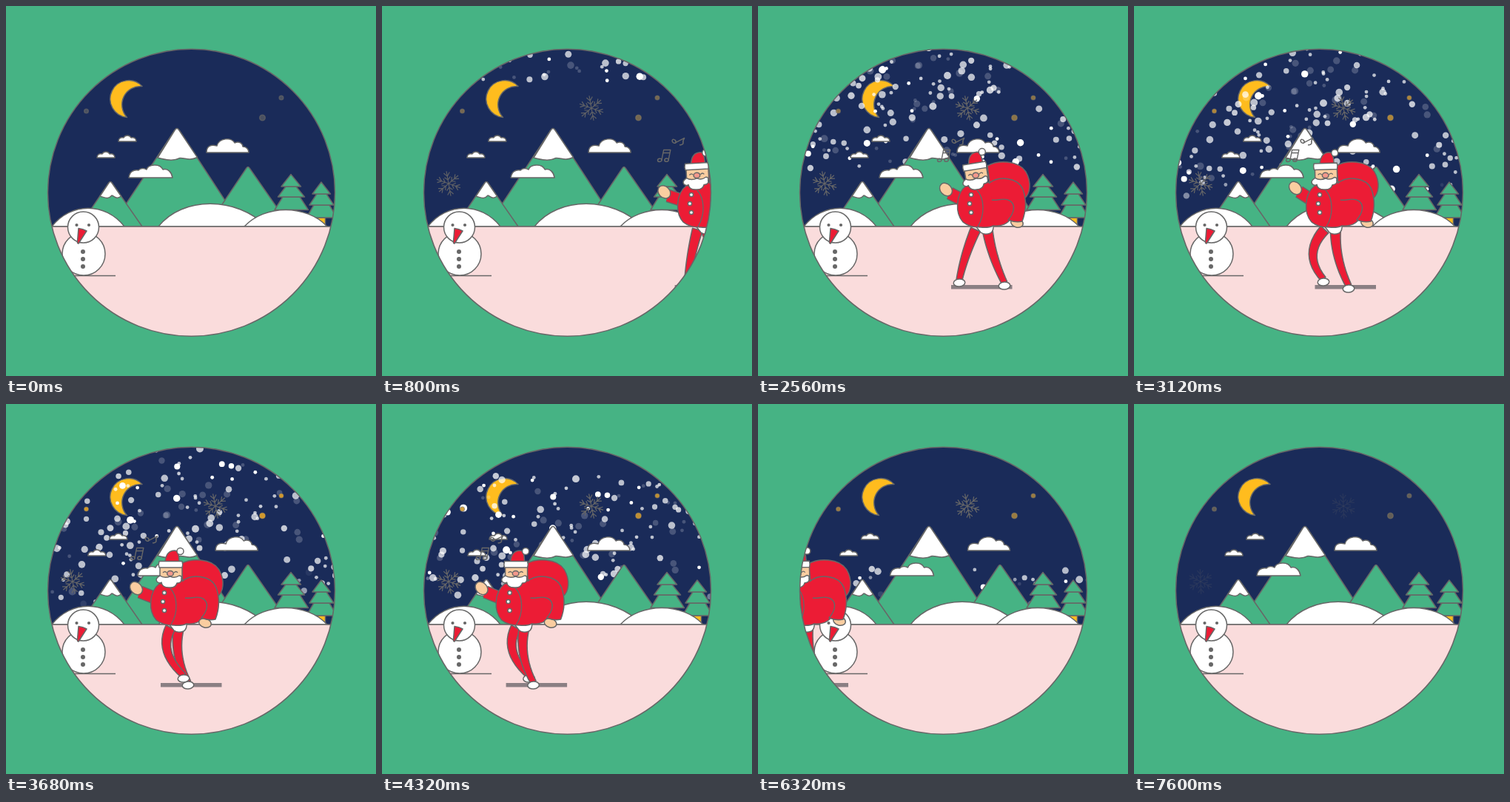
An HTML page with a canvas that plays this animation: 500 px wide and 500 px high, repeating every 7.68 s.

```html
<!DOCTYPE html>
<html lang="en">
<head>
<meta charset="utf-8">
<title>Winter walk</title>
<style>
html, body { margin: 0; width: 100%; height: 100%; overflow: hidden; background: #46b384; }
canvas { display: block; width: 500px; height: 500px; }
</style>
</head>
<body>
<canvas id="stage" width="500" height="500"></canvas>
<script>
const ctx = document.getElementById('stage').getContext('2d');
const LOOP = 7680, STEP = 80, STRIDE = 1280;
const GREEN = '#46b384', NAVY = '#1a2b59', PINK = '#fadcdc', RED = '#ec1c35',
  GOLD = '#ffbc1e', SKIN = '#facda0', LINE = '#676767', WHITE = '#fff';

// Piecewise interpolation through [time, value] pairs.
function track(keys, t, ease = u => u) {
  for (let i = 1; i < keys.length; i++) {
    const [t0, a] = keys[i - 1], [t1, b] = keys[i];
    if (t <= t1) return a + (b - a) * ease((t - t0) / (t1 - t0));
  }
  return keys[keys.length - 1][1];
}
const smooth = u => (1 - Math.cos(Math.PI * u)) / 2;

function paint(path, fill, line = LINE, width = 1.5) {
  if (fill) { ctx.fillStyle = fill; ctx.fill(path); }
  if (line) { ctx.strokeStyle = line; ctx.lineWidth = width; ctx.stroke(path); }
}
const shape = (d, fill, line, width) => paint(new Path2D(d), fill, line, width);
function oval(x, y, rx, ry, fill, line, turn = 0) {
  const p = new Path2D();
  p.ellipse(x, y, rx, ry, turn, 0, 7);
  paint(p, fill, line);
}
const dot = (x, y, r, fill, line = null) => oval(x, y, r, r, fill, line);
function at(x, y, turn, draw) {
  ctx.save();
  ctx.translate(x, y);
  ctx.rotate(turn);
  draw();
  ctx.restore();
}

let seed = 4127;
function rnd() {
  seed = (seed * 16807) % 2147483647;
  return seed / 2147483647;
}
const snow = Array.from({ length: 250 }, () => ({
  x: 56 + rnd() * 389,
  born: rnd() * 3600,
  speed: 0.061 + rnd() * 0.006,
  life: 2900 + rnd() * 600,
  r: rnd() < 0.4 ? 2.4 : 3.6 + rnd() * 1.4,
  alpha: [0.2, 0.7, 0.7, 0.7, 0.75, 1][Math.floor(rnd() * 6)]
}));

function drawSnow(t) {
  for (const s of snow) {
    const age = t - s.born;
    if (age < 0 || age > s.life) continue;
    ctx.globalAlpha = s.alpha * Math.min(1, (s.life - age) / 200);
    dot(s.x, 52 + s.speed * age, s.r, WHITE);
  }
  ctx.globalAlpha = 1;
}

const twinkle = [[0, 0], [1520, 0.5], [2560, 0.4], [3680, 0.85], [5040, 0.6], [6320, 0.5], [7600, 0.15], [7680, 0]];
function drawStars(t) {
  const glow = track(twinkle, t);
  for (const [x, y, r] of [[108.5, 142, 2.8], [346.5, 151, 3.8], [372, 124, 2.8]]) {
    ctx.globalAlpha = 0.65;
    dot(x, y, r, '#666', '#666');
    ctx.globalAlpha = glow;
    dot(x, y, r, '#e8a526');
  }
  ctx.globalAlpha = 1;
}

function drawFlakes(t) {
  const alpha = track([[0, 0], [900, 1], [6700, 1], [7600, 0.2], [7680, 0]], t);
  ctx.globalAlpha = alpha;
  for (const [x, y] of [[90, 240], [283, 138]]) {
    at(x, y, -0.2 * alpha, () => {
      for (let i = 0; i < 6; i++) {
        shape('M0 0V-17M-4 -15L0 -10L4 -15M-4 -9L0 -5L4 -9', null, LINE, 1.2);
        ctx.rotate(Math.PI / 3);
      }
    });
  }
  ctx.globalAlpha = 1;
}

const drift = [[0, 0], [1300, 12], [2560, -2], [3800, 12.5], [5080, -3], [6350, 12.5], [7600, 0], [7680, 0]];
const SMALL = 'M0 0C0 -4 3 -6 7 -5C9 -9 15 -9 17 -5C21 -6 24 -4 24 0Z';
function drawClouds(t) {
  const d = track(drift, t, smooth);
  const cloud = (x, y, path) => at(x, y, 0, () => shape(path, WHITE));
  cloud(152 - d, 183, SMALL);
  cloud(123 - d, 205, SMALL);
  cloud(271 + d, 198, 'M0 0C0 -9 6 -11 14 -9C17 -20 34 -21 38 -13C44 -16 49 -12 49 -8C54 -8 57 -4 57 0Z');
  cloud(166 + d, 232, 'M0 0C1 -8 6 -11 13 -10C16 -13 20 -13 24 -11C26 -18 42 -20 46 -11C53 -13 58 -7 59 0Z');
}

function drawLand() {
  shape('M142 298L228 168Q231 163 234 168L319 298Z', GREEN);
  shape('M205 205L228 168Q231 163 234 168L258.500 204.500C246 210 243 205 235 205.500C226 210 216 208 205 205Z', WHITE);
  shape('M99 298L139 239Q141 236 143 239L184 298Z', GREEN);
  shape('M127 257L139 239Q141 236 143 239L155.500 257C149 262 147 257 143 256C138 262 134 259 127 257Z', WHITE);
  shape('M272 298L325 219Q327 216 329 219L384 298Z', GREEN);
  // Trees, bottom tier first
  shape('M379 275H391V298H379Z', GOLD);
  shape('M374 258L363 275.500H408.500L397 258Z', GREEN);
  shape('M378 244L367.500 258H403.500L392 244Z', GREEN);
  shape('M385 227.500L372 244H398.500Z', GREEN);
  shape('M421 286H431.500V298H421Z', GOLD);
  shape('M416 269L406 286H447L437 269Z', GREEN);
  shape('M420 254L410 269H443L433 254Z', GREEN);
  shape('M426 238L414 254H438.500Z', GREEN);
  // Snow hills
  shape('M62 298C88 265 134 265 160 298Z', WHITE);
  shape('M206 298C238 257 312 257 352 298Z', WHITE);
  shape('M322 298C350 268 406 268 434 298Z', WHITE);
  shape('M40 298H460V460H40Z', PINK);
}

function drawSnowman() {
  shape('M93 364.500H148', null);
  dot(105, 335, 29, WHITE, LINE);
  dot(104.500, 299, 21, WHITE, LINE);
  dot(95.500, 296, 2.1, LINE);
  dot(112, 296, 2.1, LINE);
  shape('M98 300.500Q104 301 109 304L98 321Q96 321 96.500 318Z', RED);
  for (const y of [332, 342, 352]) dot(104, y, 3, LINE);
}

// One foot over a full stride; the other foot runs half a stride later.
const footX = [[0, -34], [240, -18], [480, 14], [560, 21], [640, 27], [880, 60], [1120, 8], [1200, -13], [1280, -34]];
const footY = [[0, 374], [240, 376], [480, 380], [560, 382], [640, 378], [880, 360], [1120, 371], [1200, 373], [1280, 374]];
const kneeBend = [[0, 2], [240, 1], [480, 7], [640, 3], [880, 10], [1120, 13], [1200, 15], [1280, 2]];

function drawLeg(phase) {
  const p = phase % STRIDE;
  const fx = track(footX, p), fy = track(footY, p);
  const hx = -4 - 8 * Math.cos(p / STRIDE * 2 * Math.PI), hy = 302;
  const ax = fx, ay = fy - 4;
  const cx = (hx + ax) / 2 - 2 * track(kneeBend, p), cy = (hy + ay) / 2;
  const left = [], right = [];
  for (let i = 0; i <= 12; i++) {
    const u = i / 12, v = 1 - u, w = 7 - 3 * u;
    const x = v * v * hx + 2 * u * v * cx + u * u * ax;
    const y = v * v * hy + 2 * u * v * cy + u * u * ay;
    const dx = v * (cx - hx) + u * (ax - cx), dy = v * (cy - hy) + u * (ay - cy);
    const n = w / Math.hypot(dx, dy);
    left.push([x - dy * n, y + dx * n]);
    right.unshift([x + dy * n, y - dx * n]);
  }
  const leg = new Path2D();
  for (const [x, y] of left.concat(right)) leg.lineTo(x, y);
  leg.closePath();
  paint(leg, RED);
  oval(fx, fy, 7.8, 5, WHITE, LINE, -0.08);
}

function drawHead(turn) {
  ctx.save();
  ctx.translate(-12, 240);
  ctx.rotate(turn);
  ctx.translate(12, -240);
  shape('M-24 220H6V236H-24Z', SKIN);
  shape('M-20 228Q-17 225 -15 228M-5 228Q-2 225 0 228', null, LINE, 1.3);
  shape('M-24 232Q-31 236 -28 240Q-25 243 -22 241Q-21 248 -12 248Q-3 249 -1 242Q6 242 5 236Q6 232 2 232Q-4 236 -10 233Q-18 236 -24 232Z', WHITE);
  oval(-10, 229, 4.3, 3.6, '#f3988b', LINE);
  shape('M-17 213C-16 203 -11 198 -4 198L0 199Q2 206 2 213Z', RED);
  shape('M-25 212.500H6Q7.500 217 6 221H-25Q-26.500 217 -25 212.500Z', WHITE);
  dot(3.5, 199, 4.5, WHITE, LINE);
  ctx.restore();
}

function drawNotes() {
  at(-54, 203, 0.2, () => {
    shape('M-3 6V-8L6 -10V4M-3 -4L6 -6', null, LINE, 1.4);
    oval(-5.500, 6.500, 2.8, 2.1, null, LINE, -0.3);
    oval(3.500, 4.500, 2.8, 2.1, null, LINE, -0.3);
  });
  at(-34, 183, 1.1, () => {
    shape('M-1 6V-8Q1 -4 5 -3Q6 0 4 2', null, LINE, 1.4);
    oval(-3.500, 6.500, 2.8, 2.1, null, LINE, -0.3);
  });
}

const walkX = [[0, 506], [1520, 373], [2560, 306], [3680, 232], [5040, 144], [6320, 64], [7680, -24]];
function drawWalker(t) {
  const half = t % (STRIDE / 2);
  const beat = (a, b, c, d) => track([[0, a], [240, b], [480, c], [560, d], [640, a]], half);
  ctx.save();
  ctx.translate(track(walkX, t), 0);

  ctx.fillStyle = '#8a7f83';
  ctx.fillRect(beat(-45, -38, -23, -24.5), 377, 82.5, 5.5);
  drawNotes();
  drawLeg(t + STRIDE / 2);
  drawLeg(t);
  shape('M-13 296Q-4 301 12 295Q13 304 8 307Q0 310 -5 306Z', WHITE);
  shape('M4 216C18 208 46 208 56 224C64 238 62 254 54 260L10 264Z', RED);

  // Raised arm
  const hx = beat(-52, -56, -56, -51), hy = beat(248, 253, 249, 246);
  const sleeve = new Path2D();
  sleeve.moveTo(-26, 264);
  sleeve.lineTo(hx + 5, hy + 5);
  paint(sleeve, null, LINE, 18);
  paint(sleeve, null, RED, 15);
  oval(hx, hy, 7.5, 9.5, SKIN, LINE, -0.75);

  shape('M-25 243C-39 254 -40 280 -29 292C-22 298 -12 299 -5 299Q6 300 12 297C24 298 34 293 39 282C42 265 40 246 20 236Z', RED);
  shape('M-10 249C0 260 1 282 -9 298', null, LINE, 1.3);
  for (const [x, y] of [[-18, 255], [-20, 267], [-18, 279]]) dot(x, y, 2.6, WHITE, LINE);

  // Arm holding the sack
  oval(beat(44, 39, 37, 46), beat(293, 295, 296, 293), 8.5, 6, SKIN, LINE, 0.3);
  shape('M6 240C18 229 45 231 52 248C57 262 56 278 51 291Q42 293 32 289C40 280 43 268 34 263C26 258 17 264 10 262', RED);
  drawHead(beat(-0.16, 0, 0, -0.03));
  ctx.restore();
}

function draw(t) {
  ctx.lineJoin = 'round';
  ctx.fillStyle = GREEN;
  ctx.fillRect(0, 0, 500, 500);
  const globe = new Path2D();
  globe.arc(250.5, 252.2, 194, 0, 7);
  ctx.save();
  ctx.clip(globe);
  ctx.fillStyle = NAVY;
  ctx.fillRect(0, 0, 500, 500);
  shape('M184 108.500A25 25 0 1 0 163.500 150.500A25 25 0 0 1 184 108.500Z', GOLD);
  drawSnow(t);
  drawStars(t);
  drawFlakes(t);
  drawLand();
  drawClouds(t);
  drawSnowman();
  drawWalker(t);
  ctx.restore();
  paint(globe, null);
}

const start = performance.now();
function tick() {
  const t = (performance.now() - start) % LOOP;
  draw(Math.floor(t / STEP) * STEP);
  requestAnimationFrame(tick);
}
tick();
</script>
</body>
</html>
```
